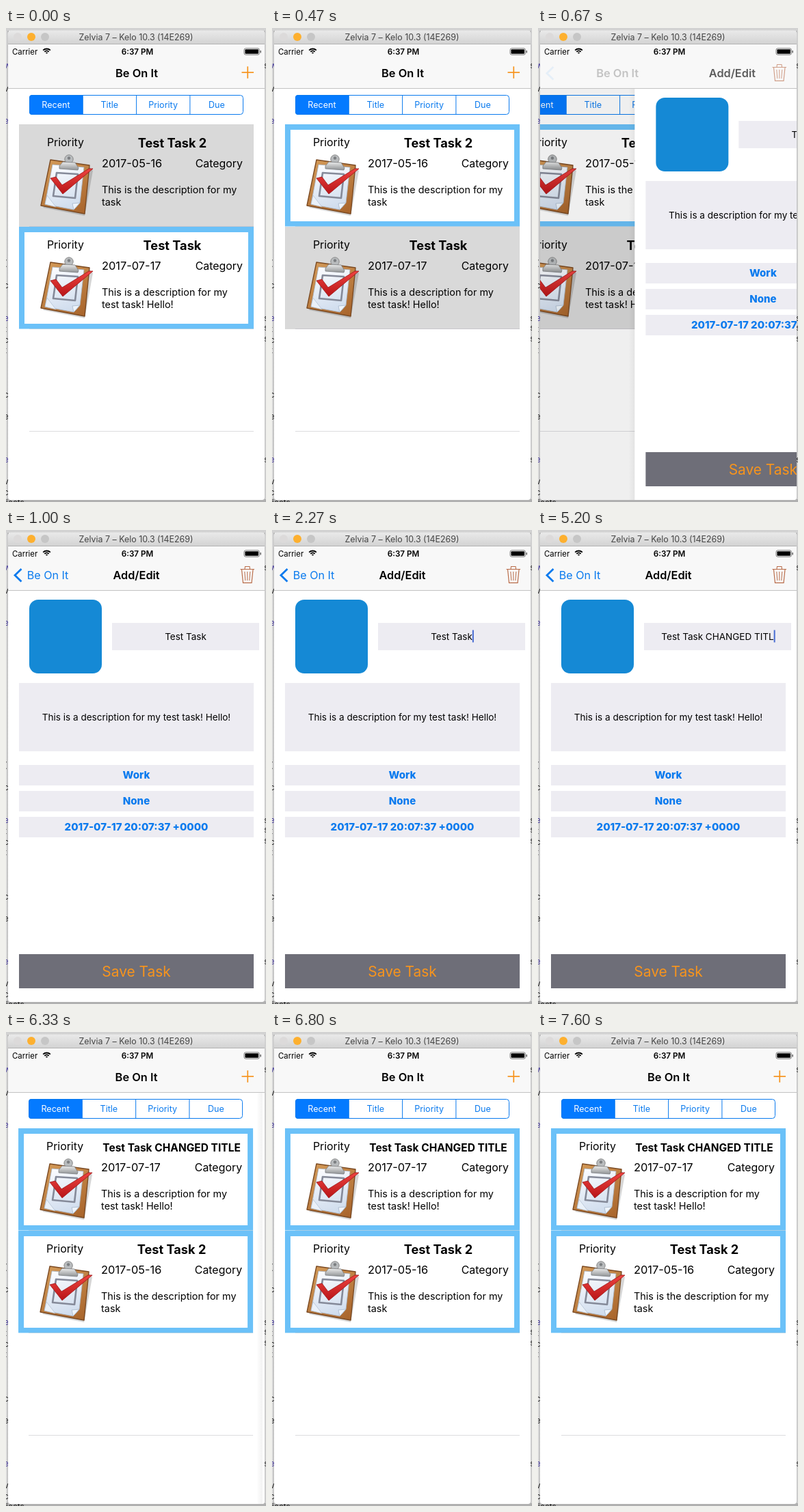
Recreate the animation shown at these times as an HTML page with a canvas. Size 380 by 694 pixels, loop 7.67 s.

```html
<!DOCTYPE html>
<html lang="en">
<head>
<meta charset="utf-8">
<title>Task editor demo</title>
<style>
html, body { margin: 0; width: 100%; height: 100%; overflow: hidden; background: #fff; }
canvas { display: block; width: 380px; height: 694px; }
</style>
</head>
<body>
<canvas id="stage"></canvas>
<script>
const LOOP = 7670, PUSH = 552, POP = 5950;
const SELECT = 430, FOCUS = 1900, TYPING = 3600;
const BLUE = '#0a7aee', FRAME = '#6bc1f8', ORANGE = '#f7941d', PANEL = '#edecf2';
const APP = 'Be On It';
const EXTRA = ' CHANGED TITLE';

const canvas = document.getElementById('stage');
const dpr = window.devicePixelRatio || 1;
canvas.width = 380 * dpr;
canvas.height = 694 * dpr;
const c = canvas.getContext('2d');

function text(s, x, y, size, color = '#000', align = 'left', weight = 400) {
  c.font = `${weight} ${size}px Inter, "Liberation Sans", sans-serif`;
  c.textAlign = align;
  c.fillStyle = color;
  c.fillText(s, x, y);
}

function rect(x, y, w, h, color) {
  c.fillStyle = color;
  c.fillRect(x, y, w, h);
}

function path(points, close) {
  c.beginPath();
  for (let i = 0; i < points.length; i += 2) c.lineTo(points[i], points[i + 1]);
  if (close) c.closePath();
}

function poly(points, fill, stroke, width = 1) {
  path(points, true);
  if (fill) { c.fillStyle = fill; c.fill(); }
  if (stroke) { c.strokeStyle = stroke; c.lineWidth = width; c.stroke(); }
}

function line(points, color, width) {
  path(points);
  c.strokeStyle = color;
  c.lineWidth = width;
  c.stroke();
}

function round(x, y, w, h, r, fill, stroke) {
  c.beginPath();
  c.roundRect(x, y, w, h, r);
  if (fill) { c.fillStyle = fill; c.fill(); }
  if (stroke) { c.strokeStyle = stroke; c.lineWidth = 1; c.stroke(); }
}

function dot(x, y, r, fill, stroke) {
  c.beginPath();
  c.arc(x, y, r, 0, 7);
  c.fillStyle = fill;
  c.fill();
  if (stroke) { c.strokeStyle = stroke; c.lineWidth = 1; c.stroke(); }
}

function gradient(x0, y0, x1, y1, from, to) {
  const g = c.createLinearGradient(x0, y0, x1, y1);
  g.addColorStop(0, from);
  g.addColorStop(1, to);
  return g;
}

function faded(alpha, draw) {
  if (alpha <= 0) return;
  c.save();
  c.globalAlpha = Math.min(1, alpha);
  draw();
  c.restore();
}

// Critically damped spring from 0 to 1
function spring(ms) {
  if (ms <= 0) return 0;
  if (ms > 440) return 1;
  const k = ms * 0.018;
  return 1 - Math.exp(-k) * (1 + k);
}

// Slivers of the editor window behind the simulator
function backdrop() {
  rect(0, 0, 380, 694, '#fff');
  rect(0, 0, 4, 694, gradient(0, 0, 4, 0, '#e4e4e4', '#a8a8a8'));
  rect(377, 0, 3, 694, gradient(377, 0, 380, 0, '#aaa', '#dcdcdc'));
  rect(0, 0, 380, 4, '#d2d2d2');
  rect(0, 690, 380, 4, '#b0b0b0');
  const marks = { 59: 'w', 93: 'v', 140: 'e', 205: 'l', 348: '(', 381: 'c', 429: 'e', 445: 't',
    461: 'c', 476: 't', 541: 'c', 573: 'e', 636: 'e', 668: 'v', 684: 'c' };
  for (const y in marks) {
    text(marks[y], -3, +y, 12, [59, 140, 429, 636].includes(+y) ? '#43379a' : '#222');
  }
  for (const y of [59, 429, 443, 459, 636]) text('s', 377, y, 12, '#333');
  text('jects', 0, 699, 12, '#222');
}

function titleBar() {
  round(2.5, 3.5, 376, 21, [5, 5, 0, 0], gradient(0, 4, 0, 24, '#e9e9e9', '#d2d2d2'));
  rect(3, 23, 375, 1, '#b4b4b4');
  dot(17, 13, 6, '#dcdada');
  dot(37, 13, 6, '#fdb02f');
  dot(57, 13, 6, '#c6c6c6');
  text('Zelvia 7 – Kelo 10.3 (14E269)', 190, 18, 12.4, '#444', 'center');
}

function statusBar() {
  text('Carrier', 9, 38.5, 11.4);
  for (const r of [2, 5, 8]) {
    c.beginPath();
    c.arc(59.5, 38, r - 0.5, -Math.PI * 0.75, -Math.PI * 0.25);
    c.strokeStyle = '#000';
    c.lineWidth = 1.8;
    c.stroke();
  }
  text('6:37 PM', 192, 38.5, 11.7, '#000', 'center', 600);
  round(348, 29.8, 22.4, 9.4, 2.4, null, '#777');
  round(349.4, 31.2, 19.6, 6.6, 1, '#000');
  rect(371.5, 33, 1.3, 3.4, '#555');
}

function trash() {
  const color = '#b96c49';
  line([342.5, 57.5, 363, 57.5], color, 1.2);
  line([349, 57, 349.5, 53.5, 356, 53.5, 356.5, 57], color, 1.1);
  line([344.5, 58, 346.5, 77.3, 359, 77.3, 361, 58], color, 1.2);
  line([348.8, 61, 349.8, 74], color, 1);
  line([352.8, 61, 352.8, 74], color, 1);
  line([356.8, 61, 355.8, 74], color, 1);
}

function navBar(p) {
  rect(3, 24, 375, 65, '#f8f8f8');
  rect(3, 88, 375, 1, '#c2c2c2');
  statusBar();
  const x = 191 - 130 * p ** 1.2;
  faded(1 - p * 1.25, () => text(APP, x, 72, 16.4, '#000', 'center', 600));
  faded((p - 0.6) / 0.4, () => line([22.5, 57, 13, 66.3, 22.5, 75.6], BLUE, 2.8));
  faded((p - 0.65) / 0.35, () => text(APP, x, 72, 16.1, BLUE, 'center'));
  faded(p, () => {
    text('Add/Edit', 190.5 + 253 * (1 - p), 72, 16.3, '#000', 'center', 600);
    trash();
  });
  faded(1 - p * 1.6, () => {
    rect(344.5, 64.2, 17.5, 1.7, ORANGE);
    rect(352.4, 56.3, 1.7, 17.5, ORANGE);
  });
}

function clipboard() {
  c.lineJoin = 'round';
  poly([54, 263, 115, 275, 127, 209, 120, 201], 'rgba(0,0,0,.16)');
  poly([65, 193, 122, 201, 115, 272, 51, 260], gradient(60, 193, 112, 271, '#d39a58', '#a9652c'), '#7b4a22', 1.4);
  poly([68, 200, 114, 204, 108, 256, 99, 266, 57, 258], gradient(70, 200, 90, 266, '#fbfcff', '#cfdced'), '#aab6c6', 0.8);
  poly([108, 256, 99, 266, 97, 257], '#eef4fb', '#9fb0c4', 0.7);
  poly([60, 245, 73, 262, 57, 258], '#eaf1f9', '#a6b5c8', 0.6);
  poly([74, 212, 105, 214, 101, 249, 69, 246], null, '#858a99', 2.6);
  dot(92, 192, 6.2, '#b9bcbe', '#888');
  dot(92, 190.5, 2.2, '#7c7f82');
  poly([83, 196, 101, 197, 106, 205, 105, 208, 78, 206, 78, 202],
    gradient(0, 196, 0, 208, '#eceded', '#8f9294'), '#7a7d80', 0.8);
  poly([65, 220, 73, 218, 82, 230, 121, 206, 127, 206, 83, 243],
    gradient(0, 206, 0, 243, '#ee4440', '#b81418'), '#9d1517', 0.8);
}

function row(y, task, selected) {
  c.save();
  c.translate(0, y);
  if (selected) {
    rect(19, 141, 343, 150, '#d9d9d9');
  } else {
    rect(19, 141, 343, 149.5, FRAME);
    rect(27, 149, 327, 134, '#fff');
  }
  rect(34, 290, 328, 1, selected ? '#c8c7cc' : '#a9cfe6');
  text('Priority', 87, 173, 15.9, '#000', 'center');
  clipboard();
  text(task.title, 243, 175, task.size, '#000', 'center', 700);
  text(task.date, 140, 204, 16.4);
  text('Category', 346, 204, 15.9, '#000', 'right');
  text(task.lines[0], 140, 242, 14.4);
  text(task.lines[1], 140, 259.5, 14.4);
  c.restore();
}

const second = { title: 'Test Task 2', size: 18.2, date: '2017-05-16',
  lines: ['This is the description for my', 'task'] };
const first = { title: 'Test Task', size: 18.2, date: '2017-07-17',
  lines: ['This is a description for my', 'test task! Hello!'] };
const edited = { ...first, title: 'Test Task' + EXTRA, size: 15.5 };

function segments() {
  round(34, 98, 78, 29, [4, 0, 0, 4], '#047aff');
  round(34.5, 98.5, 312, 28, 4, null, BLUE);
  ['Recent', 'Title', 'Priority', 'Due'].forEach((s, i) => {
    if (i) rect(33.5 + i * 78.3, 98, 1, 29, BLUE);
    text(s, 73 + i * 78.3, 117, 12.6, i ? BLUE : '#fff', 'center');
  });
}

function listView(t) {
  rect(3, 89, 500, 602, '#fff');
  segments();
  const saved = t >= POP;
  row(0, saved ? edited : second, t < SELECT);
  row(150, saved ? second : first, t >= SELECT && !saved);
  rect(34, 590, 328, 1, '#dcdcdf');
}

function typedCount(t) {
  if (t < TYPING) return 0;
  if (t < 3740) return 1;
  if (t < 3890) return 2;
  return 3 + Math.floor((t - 3890) / 122);
}

function editView(t) {
  rect(-6, 89, 9, 602, gradient(-6, 0, 3, 0, 'rgba(0,0,0,0)', 'rgba(0,0,0,.05)'));
  rect(3, 89, 375, 602, '#fff');
  round(34, 102, 106, 108, 13, '#1589d5');

  rect(155, 136, 215, 40, PANEL);
  const value = 'Test Task' + EXTRA.slice(0, typedCount(t));
  text(value, 262.5, 160.5, 13.5, '#000', 'center');
  const caretOn = t >= TYPING || (t - FOCUS) % 1000 < 550;
  if (t >= FOCUS && caretOn) {
    rect(262.5 + c.measureText(value).width / 2, 146.5, 2, 18, '#466bd2');
  }

  rect(19, 224, 343, 100, PANEL);
  text('This is a description for my test task! Hello!', 190.5, 278.5, 13.55, '#000', 'center');
  ['Work', 'None', '2017-07-17 20:07:37 +0000'].forEach((s, i) => {
    rect(19, 344 + i * 38, 343, 30, PANEL);
    text(s, 190.5, 364.3 + i * 38, 15, BLUE, 'center', 800);
  });
  rect(19, 621, 343, 50, '#6e6e78');
  text('Save Task', 190.5, 654, 20.9, ORANGE, 'center');
}

function draw(t) {
  c.setTransform(dpr, 0, 0, dpr, 0, 0);
  const p = spring(t - PUSH) - spring(t - POP);
  backdrop();
  titleBar();
  c.save();
  c.beginPath();
  c.roundRect(3, 24, 375, 667, [0, 0, 4, 4]);
  c.clip();
  if (p < 1) {
    c.save();
    c.translate(-112.5 * p, 0);
    listView(t);
    c.restore();
    rect(3, 89, 375, 602, `rgba(0,0,0,${0.1 * p})`);
  }
  if (p > 0) {
    c.save();
    c.translate(375 * (1 - p), 0);
    editView(t);
    c.restore();
  }
  navBar(p);
  c.restore();
}

const start = performance.now();
function tick() {
  draw((performance.now() - start) % LOOP);
  requestAnimationFrame(tick);
}
tick();
</script>
</body>
</html>
```
